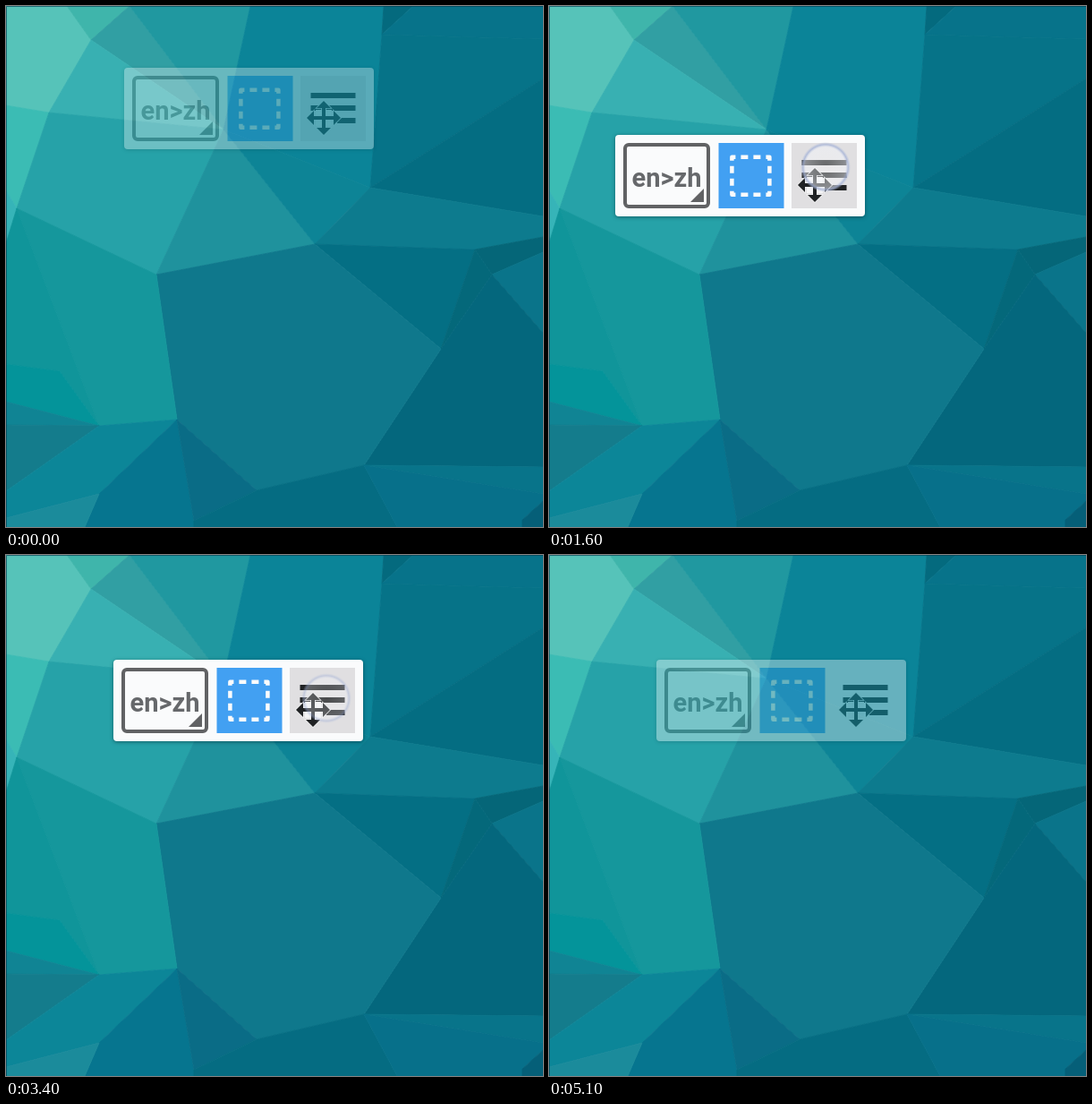
Recreate the animation shown at these times as an HTML page. Size 600x582 px, loop 5200 ms.

```html
<!DOCTYPE html>
<html lang="en">
<head>
<meta charset="utf-8">
<title>Floating toolbar</title>
<style>
  html, body { margin: 0; width: 100%; height: 100%; overflow: hidden; }
  svg { display: block; width: 600px; height: 582px; font-family: Roboto, sans-serif; }
  #bar { filter: drop-shadow(0 1px 2px rgba(0, 30, 40, .5)); }
  #menu { filter: drop-shadow(0 6px 12px rgba(0, 20, 30, .5)); }
</style>
</head>
<body>
<svg viewBox="0 0 600 582">
  <defs>
    <radialGradient id="glow">
      <stop offset="0" stop-color="#fff" stop-opacity=".3"/>
      <stop offset=".8" stop-color="#f4f6fb" stop-opacity=".5"/>
      <stop offset=".9" stop-color="#a4b2d6" stop-opacity=".8"/>
      <stop offset="1" stop-color="#b4bfdc" stop-opacity="0"/>
    </radialGradient>
  </defs>
  <g id="wallpaper" stroke-width=".8" stroke-linejoin="round"></g>
  <path d="M.5 582V.5H600" fill="none" stroke="#043c50" stroke-opacity=".65"/>

  <g id="bar">
    <rect width="279" height="91" rx="4" fill="#fafbfc"/>
    <rect x="11" y="11" width="93" height="69" rx="4" fill="none" stroke="#616264" stroke-width="4"/>
    <text x="57.5" y="58" font-size="29" font-weight="700" fill="#66686b" text-anchor="middle">en&gt;zh</text>
    <path d="M84 75h15v-15z" fill="#616264"/>
    <rect x="115.500" y="9" width="73" height="73" fill="#42a0f2"/>
    <path d="M151.400 24.700h21v42h-42v-42z" fill="none" stroke="#fafbfc" stroke-width="4.500"
      stroke-linejoin="round" stroke-dasharray="8 6" stroke-dashoffset="-3"/>
    <rect id="pressed" x="197" y="9" width="73" height="73" fill="#e0dfe1"/>
    <path d="M208.500 28h50v6h-50zM208.500 42h50v6h-50zM238 56h20.500v6h-20.500z" fill="#202224"/>
    <g transform="translate(223 56)">
      <path d="M-9-9H9V9H-9z" fill="#f4f4f5"/>
      <path id="arrows" fill="#202224" stroke="#f4f4f5" stroke-width="1.500" paint-order="stroke"
        d="M0-19l8 8H2v9h9v-6l8 8-8 8V2H2v9h6l-8 8-8-8h6V2h-9v6l-8-8 8-8v6h9v-9h-6z"/>
    </g>
  </g>

  <g id="menu">
    <rect width="381" height="420" rx="3" fill="#2d2e30"/>
    <g font-size="43" fill="#f1f1f1">
      <text x="35" y="79">Setting</text>
      <text x="35" y="199">Privacy Policy</text>
      <text x="35" y="319">About</text>
    </g>
  </g>
  <circle id="touch" r="28" fill="url(#glow)"/>
</svg>
<script>
const LOOP = 5200, STEP = 100;
const $ = id => document.getElementById(id);

// Shared corners of the low-poly wallpaper, and its faces as corner letters.
const corners = {
  a: "0,0", b: "68,0", c: "138,0", d: "273,0", e: "422,0", f: "455,0", g: "600,0",
  h: "95,38", i: "420,32", j: "600,37", k: "600,81", l: "0,111", m: "48,119",
  n: "243,138", o: "407,203", p: "600,235", q: "0,206", r: "12,226", s: "0,265",
  t: "168,300", u: "345,266", v: "524,272", w: "600,258", x: "543,300",
  y: "600,275", z: "600,365", A: "486,383", B: "0,400", C: "60,408", D: "104,469",
  E: "0,442", F: "191,462", G: "400,513", H: "600,515", I: "280,541", J: "0,468",
  K: "0,542", L: "104,545", M: "0,572", N: "88,582", O: "210,575", P: "210,582",
  Q: "437,582", R: "600,545", S: "577,574", T: "577,582", U: "600,553",
  V: "600,582", W: "0,582"
};
const faces = `abhml 56c3b9, bch 3fb5ab, chn 319fa3, cdn 2098a0, hnm 38b0b2,
  lmrq 3bbcb4, qrs 36b4b8, mntr 26a2a8, ntu 1f929d, deion 0b8498, nou 0d8496,
  efi 046a7e, fgji 07738a, ijko 067388, kpo 046d82, opwvu 0d7b8e, uvA 046f84,
  vwyx 056678, vxA 04687a, xyz 0a748a, xzHGA 04677d, tuAGIF 0f788c, rtFD 15979c,
  srDCB 10959a, BCDE 04949a, EDJ 108494, JDK 147c8c, DFLMK 0c8698, FLNPO 06758f,
  FIO 0a6c86, IGQPO 056c82, GHR 08748a, GRUSTQ 07708a, MLNW 1b8b9b, UVTS 055f78`;
$("wallpaper").innerHTML = faces.split(",").map(face => {
  const [names, color] = face.trim().split(" ");
  const points = [...names].map(name => corners[name]).join(" ");
  return `<polygon points="${points}" fill="#${color}" stroke="#${color}"/>`;
}).join("");

// Linear interpolation over [time, ...values] keys.
function track(keys, t) {
  const next = keys.findIndex(key => key[0] > t);
  if (next < 0) return keys[keys.length - 1].slice(1);
  if (next === 0) return keys[0].slice(1);
  const [t0, ...from] = keys[next - 1], [t1, ...to] = keys[next];
  return from.map((v, i) => v + (to[i] - v) * (t - t0) / (t1 - t0));
}

const barPath = [
  [200, 132, 69], [400, 160, 70], [600, 204, 76], [700, 210, 78], [800, 211, 79],
  [1000, 190, 130], [1200, 141, 165], [1400, 92, 162], [1600, 74, 144], [1700, 71, 137],
  [1900, 120, 105], [2100, 217, 115], [2300, 185, 140], [2400, 153, 133],
  [2500, 132, 124], [2600, 120, 117]
];
const barAlpha = [[0, .33], [100, .5], [300, 1], [4900, 1], [5100, .38]];
const pressAlpha = [[0, .7], [200, 1], [2700, 1], [2900, 0], [3200, 0], [3400, 1], [3600, 1], [3800, 0]];
const touchAlpha = [
  [100, 0], [300, 1], [2700, 1], [2900, 0], [3200, 0], [3300, .6], [3400, .6], [3600, 0],
  [4400, 0], [4500, 1], [4600, 1], [4800, 0]
];
const menuSize = [[3600, .5], [3700, .88], [3800, 1]];
const menuAlpha = [[3600, 0], [3800, 1], [4600, 1], [4800, 0]];

function draw(t) {
  const place = (id, [x, y], scale = 1) =>
    $(id).setAttribute("transform", `translate(${x} ${y}) scale(${scale})`);
  const fade = (id, keys) => $(id).setAttribute("opacity", track(keys, t)[0]);

  // The bar trails the finger by one step.
  const [x, y] = track(barPath, t + STEP);
  place("bar", track(barPath, t));
  place("touch", [x + 238, y + 43]);
  place("menu", [118, 198], track(menuSize, t)[0]);
  fade("bar", barAlpha);
  fade("pressed", pressAlpha);
  fade("touch", touchAlpha);
  fade("menu", menuAlpha);
}

function tick() {
  draw(Math.floor(performance.now() % LOOP / STEP) * STEP);
  requestAnimationFrame(tick);
}
tick();
</script>
</body>
</html>
```
